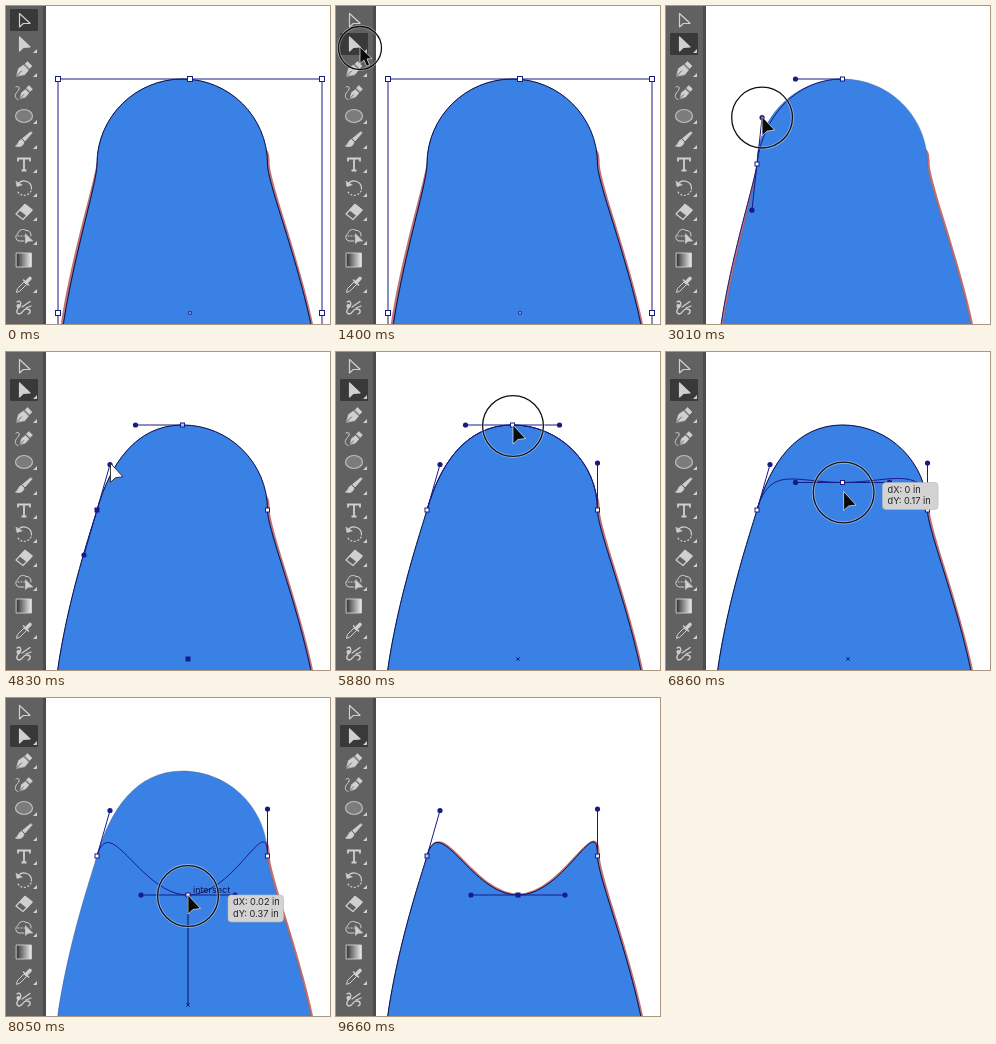
An HTML page for the animation above (9.8 s loop, 324 px wide and 318 px high).

```html
<!DOCTYPE html>
<html lang="en">
<head>
<meta charset="utf-8">
<title>Reshaping a path</title>
<style>
html, body { margin: 0; width: 100%; height: 100%; overflow: hidden; background: #fff; }
svg { display: block; width: 324px; height: 318px; }
text { font-family: Inter, "Liberation Sans", sans-serif; }
</style>
</head>
<body>
<svg viewBox="0 0 324 318" xmlns="http://www.w3.org/2000/svg">
  <rect width="324" height="318" fill="#fff"/>
  <path id="sketch" fill="none" stroke="#c1716f" stroke-width="2.8" transform="translate(.8 0)"/>
  <path id="body" fill="#3a81e5" stroke="#4a5f8c" stroke-opacity=".6" stroke-width=".7"/>
  <g id="overlay"></g>
  <g>
    <rect width="38" height="318" fill="#616161"/>
    <rect x="37" width="3" height="318" fill="#4c4c4c"/>
    <rect id="active" x="4" width="28" height="22" rx="1" fill="#393939"/>
    <g fill="none" stroke="#d0d0d0" stroke-width="1.2" stroke-linejoin="round" stroke-linecap="round">
      <path d="M13.500 7.500V21L17.300 17.500L24 17.300Z"/>
      <path d="M13.500 31V45L17.300 41.300L24 41Z" fill="#d0d0d0"/>
      <path d="M10.500 70L12.500 62.500L17.500 59L22.500 64L19 68.500ZM19 58L21.500 55.500L26 60L23.500 62.500Z" fill="#d0d0d0" stroke-width=".6"/>
      <path d="M10.500 70L15.500 65" stroke="#616161" stroke-width="1"/>
      <path d="M14 92.500L15.500 86.500L19.500 83.500L23 87L19.500 91ZM20.500 82L22.800 79.500L26.500 83L24.200 85.500Z" fill="#d0d0d0" stroke-width=".5"/>
      <path d="M14 92.500L17.500 88.700" stroke="#616161" stroke-width=".9"/>
      <path d="M10 81C14 79 14 83 11.500 85.500C8 89 9 93 12 93.500" stroke-width="1"/>
      <ellipse cx="18" cy="110" rx="8.500" ry="6.500" fill="#7c7c7c" stroke="#bdbdbd"/>
      <path d="M26 127L19 135L16.500 132.500L24.500 126ZM15.500 133.500L18 136C17 141 13 141 9.500 140C12.500 139 12 134 15.500 133.500Z" fill="#d0d0d0" stroke-width=".8"/>
      <path d="M12 155.500V152.500H24V155.500M18 152.500V164.500M15.500 164.500H20.500" stroke-width="1.800" stroke-linejoin="miter" stroke-linecap="butt"/>
      <path d="M12 178A7.500 7.500 0 0 1 25.500 183"/>
      <path d="M25 185A7.500 7.500 0 0 1 11 184" stroke-dasharray="1 2.600"/>
      <path d="M10 175.500L11 180.500L16 179Z" fill="#d0d0d0" stroke-width=".6"/>
      <path d="M10 208L19 198.500L26 204L17 213.500Z"/>
      <path d="M14 204L19 198.500L26 204L21 209.500Z" fill="#d0d0d0"/>
      <path d="M18 235H13A4 4 0 0 1 12 227.500A5 5 0 0 1 20 224.500A4.500 4.500 0 0 1 25 230" stroke-width="1"/>
      <path d="M12 230H20" stroke-dasharray="1 2" stroke-width="1"/>
      <path d="M19.500 228V237.500L22 235.200L26.500 235Z" fill="#d0d0d0" stroke-width=".6"/>
      <rect x="10.500" y="247" width="15" height="14" fill="url(#fade)" stroke-width=".9"/>
      <path d="M10.500 286L11.500 282.500L18 276L20.500 278.500L14 285Z" stroke-width="1"/>
      <path d="M17.500 274L22.500 279" stroke-width="1.600"/>
      <path d="M21 275.500L24 272.500" stroke-width="3.600"/>
      <path d="M11 296C14 294 16 297 14 300C11 303 9 307 13 308C17 308 17 302 21 303C25 303 25 307 22 308M16 301L24 295.500M20 302L25 300" stroke-width="1.300"/>
      <circle cx="12.500" cy="300" r="1.500" fill="#d0d0d0"/>
    </g>
    <g id="corners" fill="#d0d0d0"></g>
  </g>
  <g id="pointer"></g>
  <defs>
    <linearGradient id="fade"><stop stop-color="#333"/><stop offset="1" stop-color="#eee"/></linearGradient>
  </defs>
</svg>
<script>
const LOOP = 9800, NAVY = '#171b86', DARK = '#0c1150', PX_PER_INCH = 335;
const LEFT = [91, 158], RIGHT = [261.5, 158], TOP = [176.5, 73], DIP = [182, 197];
const REACH = 47;
const $ = id => document.getElementById(id);

const part = (t, a, b) => Math.min(1, Math.max(0, (t - a) / (b - a)));
const ease = p => p * p * (3 - 2 * p);
const mix = (a, b, p) => a + (b - a) * p;
const between = (t, a, b) => t >= a && t < b;

// Pointer stops: time, x, y
const stops = [
  [0, 240, 338], [760, 24, 41], [1430, 24, 41], [1850, 91, 158], [2000, 91, 158],
  [2310, 91, 110], [2700, 91, 110], [3430, 104, 111.5], [4800, 104, 111.5],
  [5460, 177, 73], [6250, 177, 73], [7300, 178, 180], [7490, 178, 180],
  [7980, 182, 197], [9100, 182, 197], [9620, 245, 335], [LOOP, 245, 335]
];
function pointerAt(t) {
  const i = Math.max(1, stops.findIndex(s => s[0] >= t));
  const a = stops[i - 1], b = stops[i], p = ease(part(t, a[0], b[0]));
  return [mix(a[1], b[1], p), mix(a[2], b[2], p)];
}

// The dragged anchor trails the pointer and snaps sideways to the axis, then to the centre.
function anchorAt(t) {
  if (t < 6250) return TOP;
  if (t >= 7980) return DIP;
  const [x, y] = pointerAt(t - 60);
  return [t < 7490 ? TOP[0] : x, y];
}

// Both handles of the left anchor turn together; p runs from upright to tilted.
const upper = p => [91 + 13 * p, 111 + 1.5 * p];
const lower = p => [91 - 13 * p, 205 - 2 * p];
const side = (a, dx) => [a[0] + dx, a[1]];
const curve = (...pts) => 'C' + pts.map(q => q.join(' ')).join(',');
const topLeft = (p, a) => curve(upper(p), side(a, -REACH), a);
const topRight = (a, reach = REACH) => curve(side(a, reach), [261.5, 111], RIGHT);
const flank = p => 'C-42 541,' + lower(p).join(' ') + ',' + LEFT;
const shape = (p, a, reach, low = p) => 'M' + LEFT + topLeft(p, a) + topRight(a, reach) +
  'C261.5 205,427 541,176.5 541' + flank(low) + 'Z';

const line = (d, color = NAVY) => `<path d="${d}" fill="none" stroke="${color}"/>`;
const outline = (p, a) => line(shape(p, a), DARK);
const dot = ([x, y]) => `<circle cx="${x}" cy="${y}" r="2.6" fill="${NAVY}"/>`;
const box = ([x, y], fill = '#fff', s = 4) =>
  `<rect x="${x - s / 2}" y="${y - s / 2}" width="${s}" height="${s}" fill="${fill}" stroke="${NAVY}"/>`;
const solid = a => box(a, NAVY);
const arm = (a, ...ends) => ends.map(e => line('M' + a + 'L' + e) + dot(e)).join('');

function bounds() {
  const corners = [[52, 73], [184, 73], [316, 73], [52, 307], [316, 307]];
  return line('M52 318V73H316V318') + corners.map(c => box(c, '#fff', 5)).join('') +
    box([184, 307], '#fff', 2.4);
}

const inches = d => String(+(d / PX_PER_INCH).toFixed(2));
function readout(a) {
  const x = a[0] + 40, y = a[1];
  return `<rect x="${x}" y="${y}" width="55.5" height="27" rx="3.5" fill="#d3d3d3" stroke="#b4b4b4" stroke-width=".6"/>
    <g font-size="9.2" fill="#222"><text x="${x + 5}" y="${y + 10.3}">dX: ${inches(a[0] - TOP[0])} in</text>
    <text x="${x + 5}" y="${y + 21.5}">dY: ${inches(a[1] - TOP[1])} in</text></g>`;
}

function overlay(t, turn, a) {
  if (t < 1900) return outline(0, TOP) + bounds();
  if (t < 2450) return outline(0, TOP) + arm(LEFT, upper(0), lower(0)) +
    arm(TOP, side(TOP, -REACH)) + solid(LEFT) + box(TOP) + box(RIGHT) + solid([184, 307]);
  if (t < 3600) return line('M176.5 541' + flank(turn) + topLeft(turn, TOP)) +
    arm(LEFT, upper(turn), lower(turn)) + arm(TOP, side(TOP, -REACH)) + box(LEFT) + box(TOP);
  if (t < 5800) return outline(1, TOP) + arm(LEFT, upper(1), lower(1)) +
    arm(TOP, side(TOP, -REACH)) + solid(LEFT) + box(TOP, '#a9c6f4') + box(RIGHT) + solid([182, 307]);

  const arms = arm(LEFT, upper(1)) + arm(RIGHT, [261.5, 111]) +
    arm(a, side(a, -REACH), side(a, REACH));
  if (t >= 8330) return outline(1, DIP) + arms + box(LEFT, '#a9c6f4') + box(RIGHT, '#d5e3fa') + solid(DIP);

  return (t < 7210 ? outline(1, TOP) : '') +
    line('M' + LEFT + topLeft(1, a) + topRight(a)) + arms + box(LEFT) + box(RIGHT) + box(a) +
    line('M180.3 305.3l3.400 3.400m0 -3.400l-3.400 3.400') +
    (a === DIP ? line('M182 197V307', DARK) + `<text x="187" y="195" font-size="9" fill="${DARK}">intersect</text>` : '');
}

function ring(t, [x, y]) {
  const presses = [[700, 840, 1400, 1550, 21.5], [2540, 2700, 3640, 3780, 30.4], [5530, 5750, 8330, 8560, 30.4]];
  const press = presses.find(p => between(t, p[0], p[3]));
  if (!press) return '';
  const [a, b, c, d, r] = press;
  const size = r * mix(.6, 1, ease(part(t, a, b)));
  const circle = (w, paint) => `<circle cx="${x}" cy="${y + 1}" r="${size}" fill="none" stroke-width="${w}" ${paint}/>`;
  return `<g opacity="${part(t, a, b) * (1 - part(t, c, d))}">` +
    circle(3, 'stroke="#fff" stroke-opacity=".4"') + circle(1.3, 'stroke="#111"') + '</g>';
}

function arrow(t, [x, y]) {
  const head = 'M0 0V19L5 14.500L12.500 13.500Z';
  const tailed = 'M0 0V16.500L3.900 13L6.600 19.200L9.600 18L7 11.900L12 11.600Z';
  const white = between(t, 3710, 5530);
  const colors = white ? 'fill="#fff" stroke="#222"' : 'fill="#0b0b0b" stroke="#fff" stroke-opacity=".7"';
  return `<path d="${t < 1900 ? tailed : head}" transform="translate(${x} ${y})" ${colors} stroke-width=".9" stroke-linejoin="round"/>`;
}

function draw(t) {
  const turn = ease(part(t, 2700, 3430));
  const a = anchorAt(t), p = pointerAt(t);
  $('body').setAttribute('d', t < 3600 ? shape(0, TOP) : t < 8330 ? shape(1, TOP) : shape(1, DIP));
  $('active').setAttribute('y', t < 1330 ? 3 : 27);
  $('overlay').innerHTML = overlay(t, turn, a);
  $('pointer').innerHTML = ring(t, p) + arrow(t, p) + (between(t, 6300, 8330) ? readout(a) : '');
}

$('sketch').setAttribute('d', shape(1, DIP, 44, .35));
$('corners').innerHTML = [47, 71, 118, 143, 167, 191, 215, 239, 287]
  .map(y => `<path d="M31 ${y - 4}V${y}H27Z"/>`).join('');

function tick() {
  draw(performance.now() % LOOP);
  requestAnimationFrame(tick);
}
tick();
</script>
</body>
</html>
```
